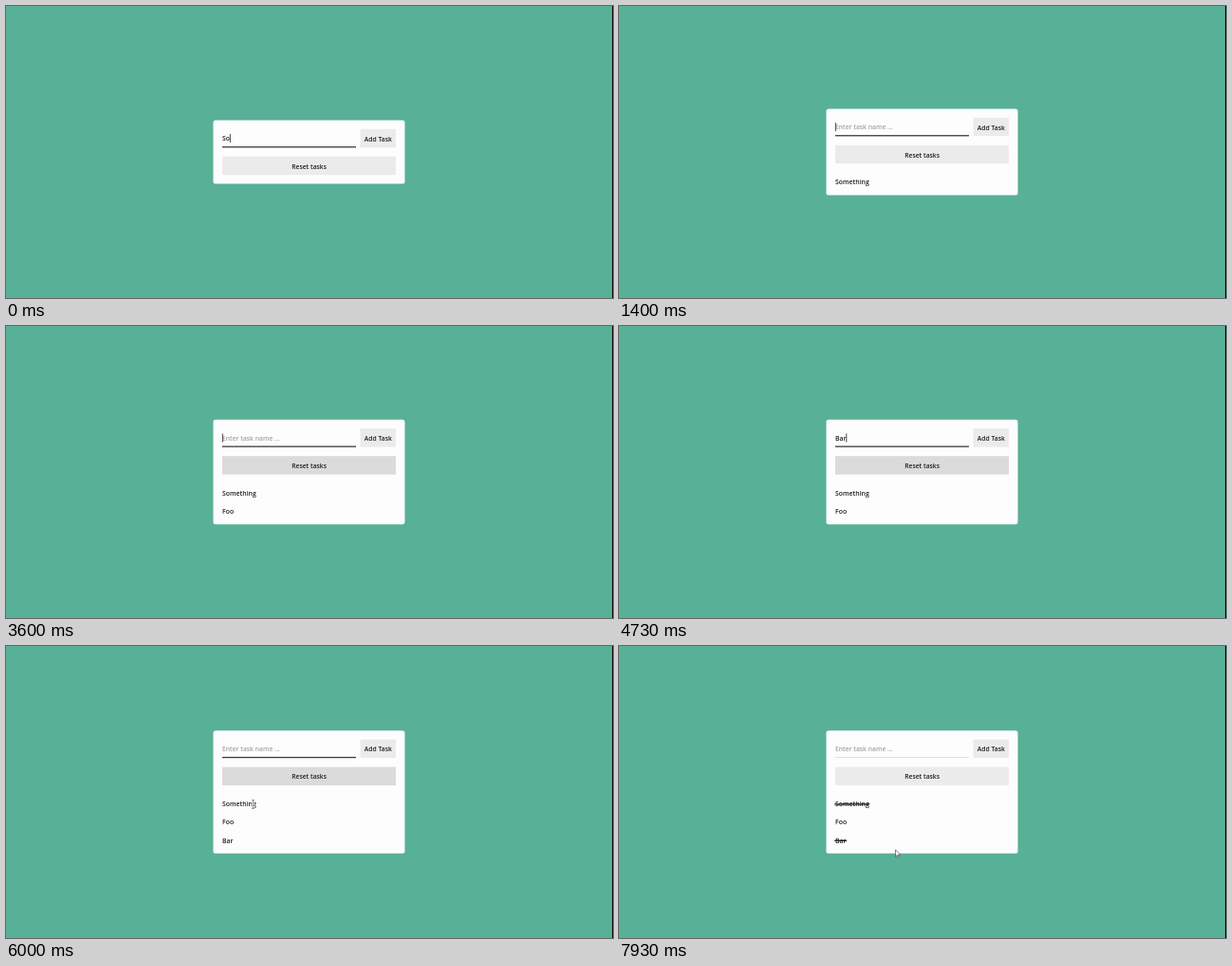
These frames come from a looping animation (640 by 308 pixels, 8 s). An HTML page:

```html
<!DOCTYPE html>
<html lang="en">
<head>
<meta charset="utf-8">
<title>Task list</title>
<style>
  html, body { margin: 0; width: 100%; height: 100%; overflow: hidden; background: #58b196; }
  svg { display: block; width: 100vw; height: 100vh; }
  text { font: 600 6.9px "Open Sans", "Noto Sans", sans-serif; fill: #202020; white-space: pre; }
  .label { font-size: 6.75px; text-anchor: middle; }
  #hint { font-size: 6.75px; fill: #a3a3a3; }
</style>
</head>
<body>
<svg viewBox="0 0 640 308">
  <rect width="640" height="308" fill="#58b196"/>
  <rect x="639" width="1" height="308" fill="#101010"/>
  <g id="card">
    <rect id="panel" x="218.5" width="202" rx="2.6" fill="#fdfdfd"/>
    <text id="hint" x="228" y="21.9">Enter task name ...</text>
    <text id="typed" x="228" y="21.9"></text>
    <rect id="caret" y="14.6" width=".8" height="9.2" fill="#202020"/>
    <rect id="line" x="228" width="141"/>
    <rect x="373.5" y="9.4" width="37.5" height="19.4" fill="#ebebeb"/>
    <text class="label" x="392.3" y="22.2">Add Task</text>
    <rect id="reset" x="228" y="38.4" width="183" height="19.4"/>
    <text class="label" x="319.6" y="51.2">Reset tasks</text>
    <g id="list"></g>
  </g>
  <g id="mouse">
    <path id="arrow" d="M0 0V7.4L1.7 5.8L2.9 8.5L4 8L2.8 5.4H5.1Z" fill="#fff" stroke="#333" stroke-width=".6"/>
    <g id="beam" fill="none">
      <path d="M0-4.4V4.4" stroke="#fdfdfd" stroke-width="2.4"/>
      <path d="M-1.3-4.4H1.3M0-4.4V4.4M-1.3 4.4H1.3" stroke="#444" stroke-width=".6"/>
    </g>
  </g>
</svg>
<script>
const LOOP = 8000, TICK = 200 / 3, BLUR = 6460;
const $ = id => document.getElementById(id);
const set = (el, attrs) => { for (const k in attrs) el.setAttribute(k, attrs[k]); };
const show = (el, on) => el.setAttribute("visibility", on ? "inherit" : "hidden");

// Each task: when its letters are typed, when it is added, when it is struck out.
const tasks = [
  { name: "Something", keys: [0, 0, 200, 260, 460, 530, 660, 860, 1000], added: 1400, done: BLUR },
  { name: "Foo", keys: [2730, 2860, 3000], added: 3200, done: Infinity },
  { name: "Bar", keys: [4330, 4600, 4730], added: 5000, done: 7400 }
];
const caretOff = [[1930, 2460], [3730, 4330], [5600, 6130], [BLUR, LOOP]];
const path = [
  [5860, 324, 146], [6000, 260.5, 167], [6200, 259, 167.5], [6500, 259, 167.5],
  [6860, 283.8, 202], [7200, 235, 204.5], [7460, 235, 204.5], [7900, 291.5, 214.8]
];

const svgEl = (tag, attrs) => {
  const el = document.createElementNS("http://www.w3.org/2000/svg", tag);
  set(el, attrs);
  return el;
};

tasks.forEach((task, i) => {
  const y = 80 + i * 19.2;
  task.row = svgEl("g", {});
  const text = svgEl("text", { x: 228, y });
  text.textContent = task.name;
  task.row.append(text);
  $("list").append(task.row);
  task.strike = svgEl("rect", {
    x: 227.2, y: y - 2.9, height: 1.2, fill: "#161616",
    width: text.getComputedTextLength() + 1.4
  });
  task.row.append(task.strike);
});

function mouseAt(t) {
  const next = path.findIndex(p => p[0] > t);
  if (next < 0) return path[path.length - 1].slice(1);
  const a = path[next - 1], b = path[next];
  const u = (t - a[0]) / (b[0] - a[0]), e = u * u * (3 - 2 * u);
  return [a[1] + (b[1] - a[1]) * e, a[2] + (b[2] - a[2]) * e];
}

function draw(t) {
  const count = tasks.filter(k => t >= k.added).length;
  const height = 67.2 + (count ? 4.8 + 19.2 * count : 0);
  set($("card"), { transform: `translate(0 ${154 - height / 2})` });
  set($("panel"), { height });

  const current = tasks[count];
  const value = current ? current.name.slice(0, current.keys.filter(k => t >= k).length) : "";
  $("typed").textContent = value;
  show($("hint"), !value);
  show($("caret"), !caretOff.some(([a, b]) => t >= a && t < b));
  set($("caret"), { x: 227.9 + (value ? $("typed").getComputedTextLength() : 0) });

  const focused = t < BLUR;
  set($("line"), focused
    ? { y: 27.7, height: 1.3, fill: "#3c3c3c" }
    : { y: 28, height: 0.8, fill: "#d8d8d8" });
  set($("reset"), { fill: t >= 3270 && t < 6060 ? "#dbdbdb" : "#ebebeb" });

  for (const task of tasks) {
    show(task.row, t >= task.added);
    show(task.strike, t >= task.added && t >= task.done);
  }

  const moving = t >= path[0][0];
  show($("mouse"), moving);
  if (!moving) return;
  const [x, y] = mouseAt(Math.max(path[0][0], Math.floor(t / TICK + 0.15) * TICK));
  const overText = (x < 266 && y > 162 && y < 172) || (x < 240 && y > 200 && y < 210);
  set($("mouse"), { transform: `translate(${x} ${y})` });
  show($("beam"), overText);
  show($("arrow"), !overText);
}

const start = performance.now();
function frame() {
  draw((performance.now() - start) % LOOP);
  requestAnimationFrame(frame);
}
frame();
</script>
</body>
</html>
```
